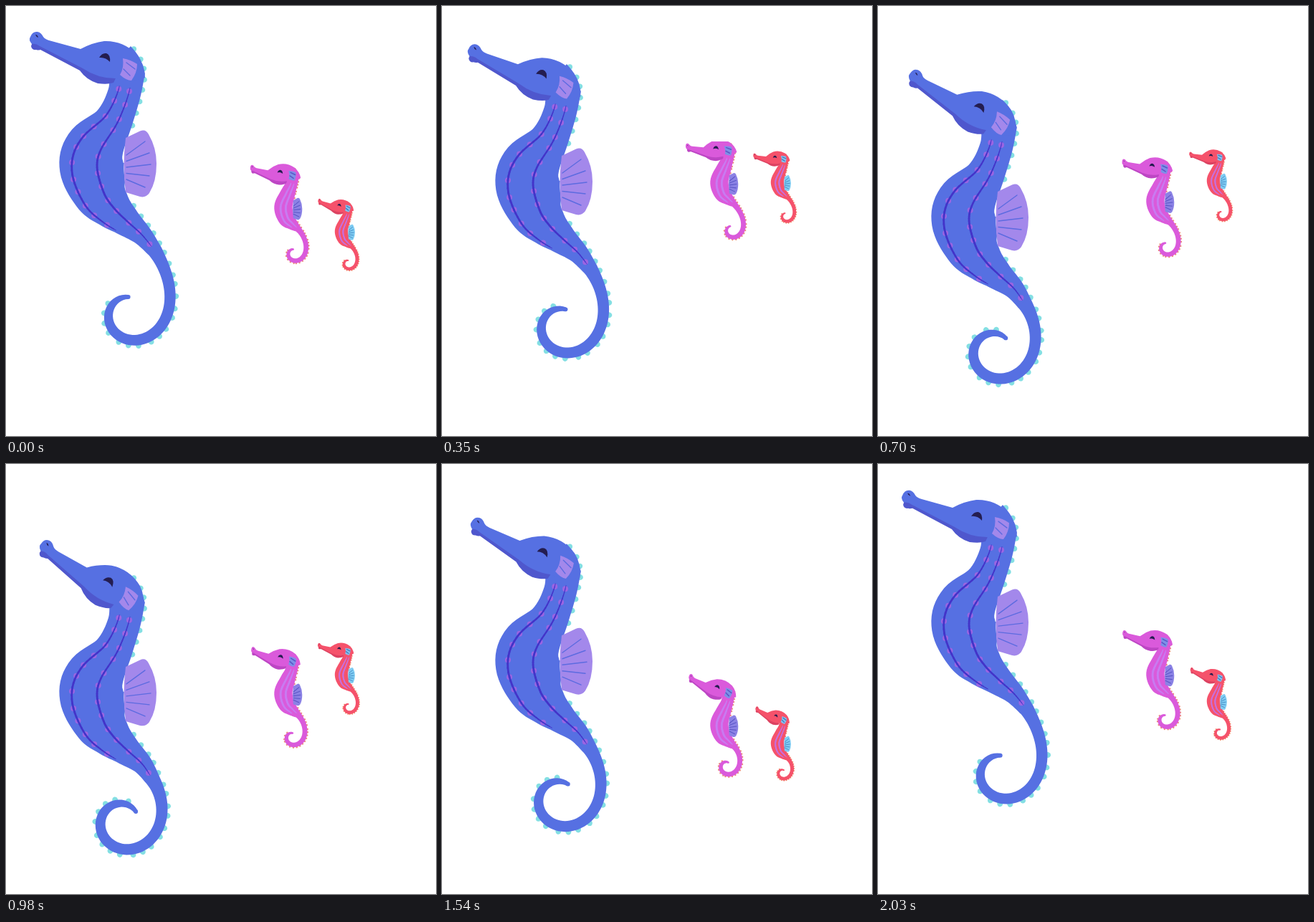
Write an HTML page with a canvas that moves like this. It is 600 px wide and 600 px high and loops after 2.1 s.

```html
<!DOCTYPE html>
<html lang="en">
<head>
<meta charset="utf-8">
<title>Seahorses</title>
<style>
html, body { margin: 0; width: 100%; height: 100%; overflow: hidden; background: #fff; }
canvas { display: block; width: 600px; height: 600px; }
</style>
</head>
<body>
<canvas id="stage"></canvas>
<script>
const LOOP = 2100, STEP = 70, RAD = Math.PI / 180;
const canvas = document.getElementById('stage');
const ctx = canvas.getContext('2d');
const dpr = window.devicePixelRatio || 1;
canvas.width = canvas.height = 600 * dpr;

// Head paths around a forehead at x = 104; the snout before it is scaled by k.
function makeHead(k) {
  const n = x => 104 - (104 - x) * k;
  return {
    under: new Path2D(`M${n(37)} 50L${n(35)} 56Q${n(36)} 62 ${n(42)} 61Q${n(45)} 62 ${n(48)} 61L103 90
      Q112 103 128 108Q142 110 150 107L153 101L140 94L104 76L${n(48)} 46Z`),
    top: new Path2D(`M152 101Q128 101 107 87L${n(47)} 56Q${n(42)} 52 ${n(36)} 53Q${n(31)} 47 ${n(34)} 43
      Q${n(37)} 35 ${n(44)} 36Q${n(49)} 37 ${n(52)} 43Q${n(54)} 46 ${n(60)} 48L104 60
      Q121 51 137 49Q163 48 182 67Q194 81 194 100Q175 108 152 101Z`),
    eye: new Path2D('M130 72Q134 65 140 66Q146 68 145 78Q139 71 130 72Z'),
    nostril: new Path2D(`M${n(41)} 40Q${n(44)} 40 ${n(45)} 44Q${n(42)} 43 ${n(41)} 40Z`),
    gill: new Path2D('M163 73Q174 75 183 81Q183 93 175 104Q168 104 159 96Q165 86 163 73Z'),
    gillLines: new Path2D('M168 79L180 88M164 88L173 97')
  };
}

const fin = new Path2D('M167 184L187 174.500Q195 171 199 179Q210 198 210 220Q210 245 200 261Q195 268 187 266L167 260Q162 222 167 184Z');
const finRays = new Path2D();
for (let i = -2; i <= 2; i++) {
  finRays.moveTo(168, 225 + 8.5 * i);
  finRays.lineTo(202 - 2 * i * i, 221 + 16 * i);
}

// Trunk: x, y, half width down the spine. Stripes: start, end, and side at each end (-1 belly, 1 back).
const big = {
  trunk: [[169, 92, 25], [165, 122, 23], [150, 160, 27], [125, 197, 42], [120, 226, 45],
    [132, 262, 38], [148, 283, 29], [168, 301, 21], [190, 320, 14.5], [208, 342, 10.3]],
  crest: [[174, 56], [186, 72]],
  tail: { length: 253, from: 58, turn: 78, curl: 228, power: 2.3, bend: 54, sway: -3 },
  head: { paths: makeHead(1), x: 168, y: 89, size: 1, tilt: 0, swing: 14 },
  fin: { sx: 1, sy: 1, x: 0, y: 0, line: 1.4 },
  stripes: [[0.08, 0.78, -0.38, -0.85], [0.09, 0.97, 0.27, 0]],
  stripeWidth: 2.4, dotGap: 21,
  tooth: { along: 4, out: 4.6, gap: 15.5 },
  body: '#5670e2', under: '#4f57cd', finFill: '#a388eb', finLine: '#5c6be0',
  gill: '#a388eb', stripe: '#4334c9', dot: '#9a65e2', teeth: '#84dfe3',
  topTime: 0, lowTime: 1050, rise: 0, drop: 100
};
const baby = {
  trunk: [[400, 241, 9], [398, 253, 8.5], [393, 266, 10.5], [387, 284, 12.7],
    [391, 300, 11.5], [399, 308, 8.5], [407.5, 315, 4.6]],
  crest: [[402, 230], [407, 238]],
  tail: { length: 81, from: 48, turn: 70, curl: 230, power: 3, bend: 45, sway: 0 },
  head: { paths: makeHead(0.7), x: 398, y: 241, size: 0.478, tilt: -16, swing: 18 },
  fin: { sx: 0.29, sy: 0.33, x: 352.4, y: 214.4, line: 3.2 },
  stripes: [[0.15, 0.9, -0.1, -0.5], [0.15, 0.95, 0.4, 0.1]],
  stripeWidth: 2.4,
  tooth: { along: 1.3, out: 1.7, gap: 4.6 }
};
const pink = {
  ...baby, clipTop: 189,
  body: '#da5adb', under: '#bd46c4', finFill: '#8b82e5', finLine: '#5a56c6',
  gill: '#7d90e8', stripe: '#c97bf0', teeth: '#ec8f7c',
  topTime: 380, lowTime: 1430, rise: -39, drop: 82
};
const red = {
  ...baby, scale: 0.72,
  body: '#f5526b', under: '#dc4261', finFill: '#7fcdf3', finLine: '#3577b8',
  gill: '#86bfee', stripe: '#c86fdc', teeth: '#f08a62',
  topTime: 535, lowTime: 1585, rise: -78, drop: 78
};

// 0 at the top of the swim, 1 at the bottom, eased both ways.
function swim(s, t) {
  const fall = s.lowTime - s.topTime;
  const since = (t - s.topTime + LOOP) % LOOP;
  const p = since < fall ? since / fall : 1 + (since - fall) / (LOOP - fall);
  return (1 - Math.cos(Math.PI * p)) / 2;
}

// Catmull-Rom samples through the points, in every component.
function smooth(pts, detail = 8) {
  const out = [], last = pts.length - 1;
  const at = i => pts[Math.max(0, Math.min(last, i))];
  for (let i = 0; i < last; i++) {
    const a = at(i - 1), b = at(i), c = at(i + 1), d = at(i + 2);
    for (let u = 0; u < 1; u += 1 / detail) {
      out.push(b.map((v, j) => 0.5 * (2 * v + (c[j] - a[j]) * u
        + (2 * a[j] - 5 * v + 4 * c[j] - d[j]) * u * u
        + (3 * v - a[j] - 3 * c[j] + d[j]) * u * u * u)));
    }
  }
  return out;
}

// The tail tightens along its length and curls further as q grows.
function tailSpine(tail, [x, y, w], q, steps = 64) {
  const out = [], len = tail.length / steps;
  for (let i = 0; i <= steps; i++) {
    out.push([x, y, w * (0.28 + 0.46 * (1 - (i / steps) ** 6) + 0.26 * Math.exp(-12 * i / steps))]);
    const u = (i + 0.5) / steps;
    const angle = (tail.from + tail.turn * u + tail.curl * u ** tail.power
      + tail.bend * q * Math.sin(u * Math.PI / 2)) * RAD;
    x += Math.cos(angle) * len;
    y += Math.sin(angle) * len;
  }
  return out;
}

// Line running beside the spine; side(u) is measured in half widths.
function beside(spine, side) {
  const last = spine.length - 1;
  return spine.map(([x, y, w], i) => {
    const a = spine[Math.max(0, i - 1)], b = spine[Math.min(last, i + 1)];
    const dx = b[0] - a[0], dy = b[1] - a[1];
    const k = w * side(i / last) / Math.hypot(dx, dy);
    return [x + dy * k, y - dx * k];
  });
}

// Calls mark(x, y, angle) at even gaps along a line.
function walk(line, gap, first, mark) {
  let left = first;
  for (let i = 1; i < line.length; i++) {
    const [x, y] = line[i], dx = x - line[i - 1][0], dy = y - line[i - 1][1];
    left -= Math.hypot(dx, dy);
    if (left > 0) continue;
    left += gap;
    mark(x, y, Math.atan2(dy, dx));
  }
}

function fillShape(path, color) {
  ctx.fillStyle = color;
  ctx.fill(path);
}

function strokeShape(path, color, width) {
  ctx.strokeStyle = color;
  ctx.lineWidth = width;
  ctx.stroke(path);
}

function oval(x, y, rx, ry, angle, color) {
  ctx.fillStyle = color;
  ctx.beginPath();
  ctx.ellipse(x, y, rx, ry, angle, 0, Math.PI * 2);
  ctx.fill();
}

function drawBody(s, spine) {
  const back = smooth([...s.crest, beside(spine, () => 1)[0]]).concat(beside(spine, () => 1));
  const { along, out, gap } = s.tooth;
  const finTop = s.fin.y + 176 * s.fin.sy, finEnd = s.fin.y + 268 * s.fin.sy;
  walk(back.slice(0, -4), gap, gap * 0.3, (x, y, angle) => {
    if (y < finTop || y > finEnd) oval(x, y, along, out, angle, s.teeth);
  });

  const outline = new Path2D();
  for (const p of [...back, ...beside(spine, () => -1).reverse()]) outline.lineTo(...p);
  fillShape(outline, s.body);
  const [x, y, w] = spine[spine.length - 1];
  oval(x, y, w, w, 0, s.body);
}

function drawStripe(s, trunk, [from, to, side0, side1]) {
  const part = trunk.slice(Math.round(from * trunk.length), Math.round(to * trunk.length));
  const line = beside(part, u => side0 + (side1 - side0) * u);
  if (s.dotGap) walk(line, s.dotGap, 0, (x, y) => oval(x, y, 4, 4, 0, s.dot));
  ctx.strokeStyle = s.stripe;
  for (let i = 1; i < line.length; i++) {
    ctx.lineWidth = 0.4 + s.stripeWidth * Math.sqrt(Math.sin(Math.PI * i / line.length));
    ctx.beginPath();
    ctx.moveTo(...line[i - 1]);
    ctx.lineTo(...line[i]);
    ctx.stroke();
  }
}

function drawFin(s) {
  const { sx, sy, x, y, line } = s.fin;
  ctx.save();
  ctx.translate(x, y);
  ctx.scale(sx, sy);
  fillShape(fin, s.finFill);
  strokeShape(finRays, s.finLine, line);
  ctx.restore();
}

function drawHead(s, q) {
  const { paths, x, y, size, tilt, swing } = s.head;
  ctx.save();
  ctx.translate(x, y);
  ctx.rotate((tilt + swing * q) * RAD);
  ctx.scale(size, size);
  ctx.translate(-168, -89);
  fillShape(paths.under, s.under);
  fillShape(paths.top, s.body);
  fillShape(paths.eye, '#241d50');
  fillShape(paths.nostril, '#241d50');
  fillShape(paths.gill, s.gill);
  strokeShape(paths.gillLines, s.finLine, s.fin.line);
  ctx.restore();
}

function drawSeahorse(s, t) {
  const q = swim(s, t);
  const [hipX, hipY, hipW] = s.trunk[s.trunk.length - 1];
  const hip = [hipX + s.tail.sway * q, hipY, hipW];
  const trunk = smooth([...s.trunk.slice(0, -1), hip]);
  const spine = [...trunk, ...tailSpine(s.tail, hip, q)];

  ctx.save();
  if (s.clipTop) {
    ctx.beginPath();
    ctx.rect(0, s.clipTop, 600, 600);
    ctx.clip();
  }
  ctx.translate(0, s.rise + (s.drop - s.rise) * q);
  if (s.scale) {
    ctx.translate(482, 313.5);
    ctx.scale(s.scale, s.scale);
    ctx.translate(-406.5, -287);
  }
  drawBody(s, spine);
  drawFin(s);
  drawHead(s, q);
  for (const stripe of s.stripes) drawStripe(s, trunk, stripe);
  ctx.restore();
}

const start = performance.now();
function frame() {
  const t = Math.floor((performance.now() - start) % LOOP / STEP) * STEP;
  ctx.setTransform(dpr, 0, 0, dpr, 0, 0);
  ctx.fillStyle = '#fff';
  ctx.fillRect(0, 0, 600, 600);
  ctx.lineCap = 'round';
  for (const s of [big, pink, red]) drawSeahorse(s, t);
  requestAnimationFrame(frame);
}
frame();
</script>
</body>
</html>
```
